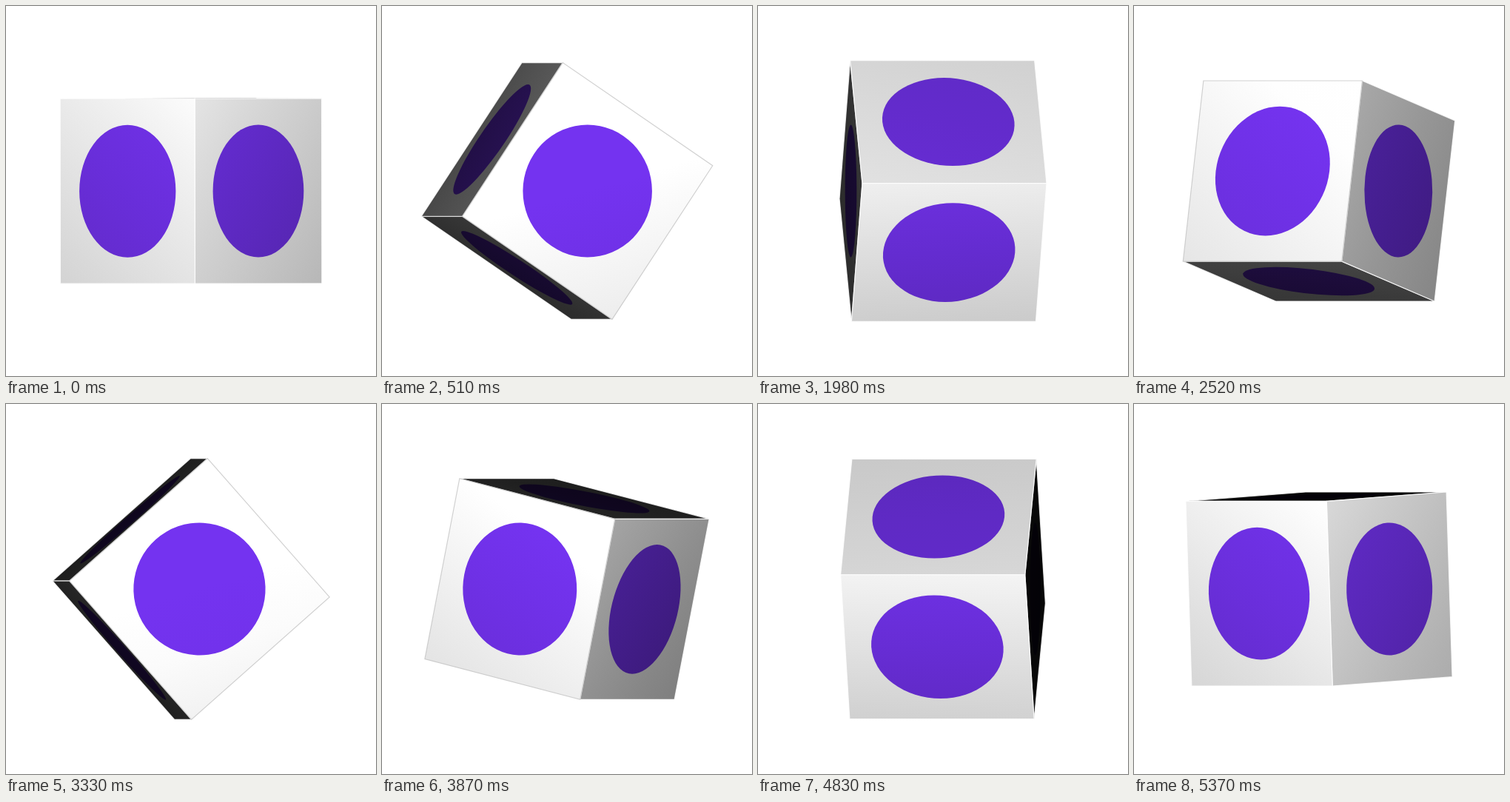
Write an HTML page with a canvas that moves like this. It is 500 px wide and 500 px high and loops after 5400 ms.

```html
<!DOCTYPE html>
<html lang="en">
<head>
<meta charset="utf-8">
<title>Spinning cube</title>
<style>
  html, body { margin: 0; width: 100%; height: 100%; overflow: hidden; background: #fff; }
  canvas { display: block; width: 500px; height: 500px; }
</style>
</head>
<body>
<canvas id="stage" width="500" height="500"></canvas>
<script>
const ctx = document.getElementById('stage').getContext('2d');
const LOOP = 5400, STEP = 30;
const HALF = 125, RADIUS = 89.5;
const LIGHT = [-150, 0, 2500];
const WHITE = [255, 255, 255], DISC = [116, 51, 240];
const rad = deg => deg * Math.PI / 180;
const dot = (a, b) => a[0] * b[0] + a[1] * b[1] + a[2] * b[2];
const scale = (a, k) => a.map(v => v * k);
const add = (a, b) => a.map((v, i) => v + b[i]);

// Screen axes of the cube: x right, y down, z towards the viewer.
function cubeAxes(a, b) {
  const ca = Math.cos(a), sa = Math.sin(a), cb = Math.cos(b), sb = Math.sin(b);
  return [
    [cb, 0, -sb],
    [sa * sb, ca, sa * cb],
    [ca * sb, -sa, ca * cb]
  ];
}

// Brightness from 0 to 1 at point p of a face with normal n.
function shade(p, n) {
  const ray = add(LIGHT, scale(p, -1));
  const d = Math.max(0, dot(n, ray) / Math.hypot(...ray));
  const base = 8 + Math.min(300 * d ** 0.85, 145 + 105 * d);
  const falloff = 1 - p[1] * 0.0004 + (p[2] - 90) * 0.0003;
  return Math.min(1, Math.max(0.03, base * falloff / 255));
}

const tint = (color, k) => `rgb(${color.map(c => Math.round(c * k)).join(',')})`;

function shadedFill(color, face) {
  const { center, n, u, v } = face;
  const at = (i, j) => shade(add(center, add(scale(u, i * HALF), scale(v, j * HALF))), n);
  const gu = at(1, 0) - at(-1, 0), gv = at(0, 1) - at(0, -1);
  const len = Math.hypot(gu, gv) || 1;
  const du = gu / len, dv = gv / len;
  const reach = HALF * (Math.abs(du) + Math.abs(dv));
  const fill = ctx.createLinearGradient(-du * reach, -dv * reach, du * reach, dv * reach);
  for (let i = 0; i <= 4; i++) {
    const k = (i / 2 - 1) * reach / HALF;
    fill.addColorStop(i / 4, tint(color, at(du * k, dv * k)));
  }
  return fill;
}

function drawFace(face) {
  const { center, u, v, level } = face;
  ctx.setTransform(u[0], u[1], v[0], v[1], 250 + center[0], 250 + center[1]);
  ctx.beginPath();
  ctx.rect(-HALF, -HALF, 2 * HALF, 2 * HALF);
  ctx.fillStyle = shadedFill(WHITE, face);
  ctx.fill();
  ctx.save();
  ctx.resetTransform();
  ctx.lineWidth = 1.2;
  ctx.strokeStyle = level > 0.94 ? 'rgba(190,190,190,.7)' : 'rgba(255,255,255,.8)';
  ctx.stroke();
  ctx.restore();
  ctx.beginPath();
  ctx.arc(0, 0, RADIUS, 0, 2 * Math.PI);
  ctx.fillStyle = shadedFill(DISC, face);
  ctx.fill();
}

function draw(time) {
  const n = Math.floor(time % LOOP / STEP);
  const axes = cubeAxes(rad(1.996 * n - 0.1), rad(-43.3 - 1.995 * n));
  const faces = axes.map((axis, i) => {
    const normal = scale(axis, axis[2] < 0 ? -1 : 1);
    const center = scale(normal, HALF);
    return {
      n: normal, center, u: axes[(i + 1) % 3], v: axes[(i + 2) % 3],
      level: shade(center, normal)
    };
  });
  faces.sort((p, q) => p.level - q.level);
  ctx.resetTransform();
  ctx.fillStyle = '#fff';
  ctx.fillRect(0, 0, 500, 500);
  faces.forEach(drawFace);
}

let start = null;
function tick(now) {
  if (start === null) start = now;
  draw(Math.max(0, now - start));
  requestAnimationFrame(tick);
}
draw(0);
requestAnimationFrame(tick);
</script>
</body>
</html>
```
